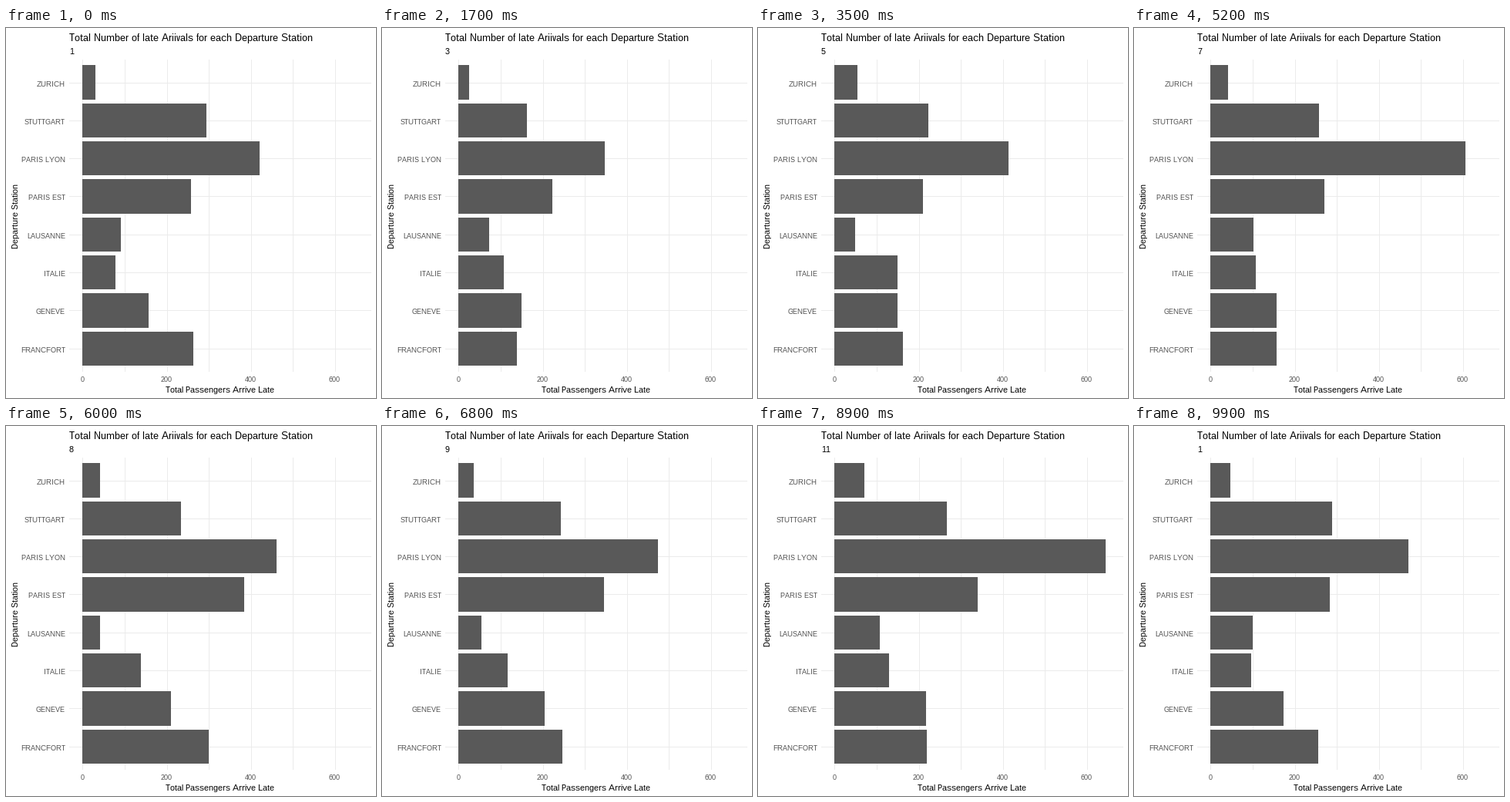
Animation of 480x480 px, one loop 10000 ms. Source, as a matplotlib script:

```python
import matplotlib.pyplot as plt
import numpy as np
from matplotlib.animation import FuncAnimation
from matplotlib.patches import Rectangle

plt.rcParams.update({
    "font.family": "Liberation Sans",
    "text.hinting": "native",
    "text.hinting_factor": 1,
    "text.kerning_factor": 12,  # large enough to switch kerning off
    "toolbar": "None",
})

SIZE, DPI = 480, 72
FRAMES, STEP_MS, MOVE = 100, 100, 4
BAR, GRID, TICK = "#595959", "#ebebeb", "#4d4d4d"

# Panel geometry in pixels, y pointing down
LEFT, RIGHT, TOP, BOTTOM = 82, 474, 41, 446
X0, UNIT = 99.49, 3.272 / 6
MID, ROW, BAR_H = 70.57, 49.3, 44.33

MONTHS = np.arange(1, 13)
KEY_MONTHS = [1, 3, 5, 7, 8, 10, 12]

# Late arrivals in sixes: at the key months, or at every month
STATIONS = {
    "ZURICH": [5, 4, 9, 7, 7, 5, 16],
    "STUTTGART": [49, 27, 37, 43, 39, 42, 46],
    "PARIS LYON": [70, 55, 58, 98, 69, 92, 101, 77, 79, 72, 109, 103],
    "PARIS EST": [43, 37, 35, 45, 64, 51, 60],
    "LAUSANNE": [15, 12, 8, 17, 7, 11, 22],
    "ITALIE": [13, 18, 25, 18, 23, 16, 25],
    "GENEVE": [26, 25, 25, 26, 35, 33, 38],
    "FRANCFORT": [44, 23, 27, 26, 50, 32, 39],
}


def px(v):
    return int(np.floor(v + 0.5))


def by_month(points):
    keys = KEY_MONTHS if len(points) == len(KEY_MONTHS) else MONTHS
    return 6 * np.interp(MONTHS, keys, points)


def month_position(n):
    """Months passed at frame n; the pauses get one frame shorter after May."""
    k = MONTHS - 1
    starts = 5 + 8 * k + np.minimum(k, 4)
    return np.clip((n - starts + 1) / MOVE, 0, 1).sum()


fig = plt.figure(figsize=(SIZE / DPI, SIZE / DPI), dpi=DPI, facecolor="white")
ax = fig.add_axes([0, 0, 1, 1])
ax.set_xlim(0, SIZE)
ax.set_ylim(SIZE, 0)
ax.axis("off")


def box(x, y, w, h, color, z):
    return ax.add_patch(Rectangle((x, y), w, h, facecolor=color, linewidth=0,
                                  antialiased=False, zorder=z))


def label(x, y, s, size, color="black", ha="left", **kw):
    return ax.text(x, y, s, fontsize=size, color=color, ha=ha,
                   va="baseline", zorder=4, **kw)


for value in range(0, 601, 100):
    x = X0 + value * UNIT
    box(px(x), TOP, 1, BOTTOM - TOP, GRID, 1)
    if value % 200 == 0:
        label(x - 0.5, 459, str(value), 9, TICK, "center")

bars = []
for i, name in enumerate(STATIONS):
    mid = MID + i * ROW
    top, bottom = px(mid - BAR_H / 2), px(mid + BAR_H / 2)
    box(LEFT, px(mid), RIGHT - LEFT, 1, GRID, 1)
    bars.append(box(px(X0), top, 0, bottom - top, BAR, 2))
    label(77, px(mid) + 5, name, 9, TICK, "right")

label(82, 17, "Total Number of late Ariivals for each Departure Station", 13)
subtitle = label(82, 34, "1", 11)
label(277.5, 473, "Total Passengers Arrive Late", 11, ha="center")
label(16, 243.5, "Departure Station", 11, ha="center",
      rotation=90, rotation_mode="anchor")

totals = np.array([by_month(p) for p in STATIONS.values()]).T


def draw(n):
    pos = month_position(n)
    now, part = int(pos), pos % 1
    count = len(MONTHS)
    a, b = totals[now % count], totals[(now + 1) % count]
    for bar, value in zip(bars, a + (b - a) * part):
        bar.set_width(px(X0 + value * UNIT) - px(X0))
    subtitle.set_text(str(px(pos) % count + 1))
    return bars + [subtitle]


anim = FuncAnimation(fig, draw, frames=FRAMES, interval=STEP_MS,
                     init_func=lambda: draw(0), repeat=True, repeat_delay=0)
plt.show()
```
